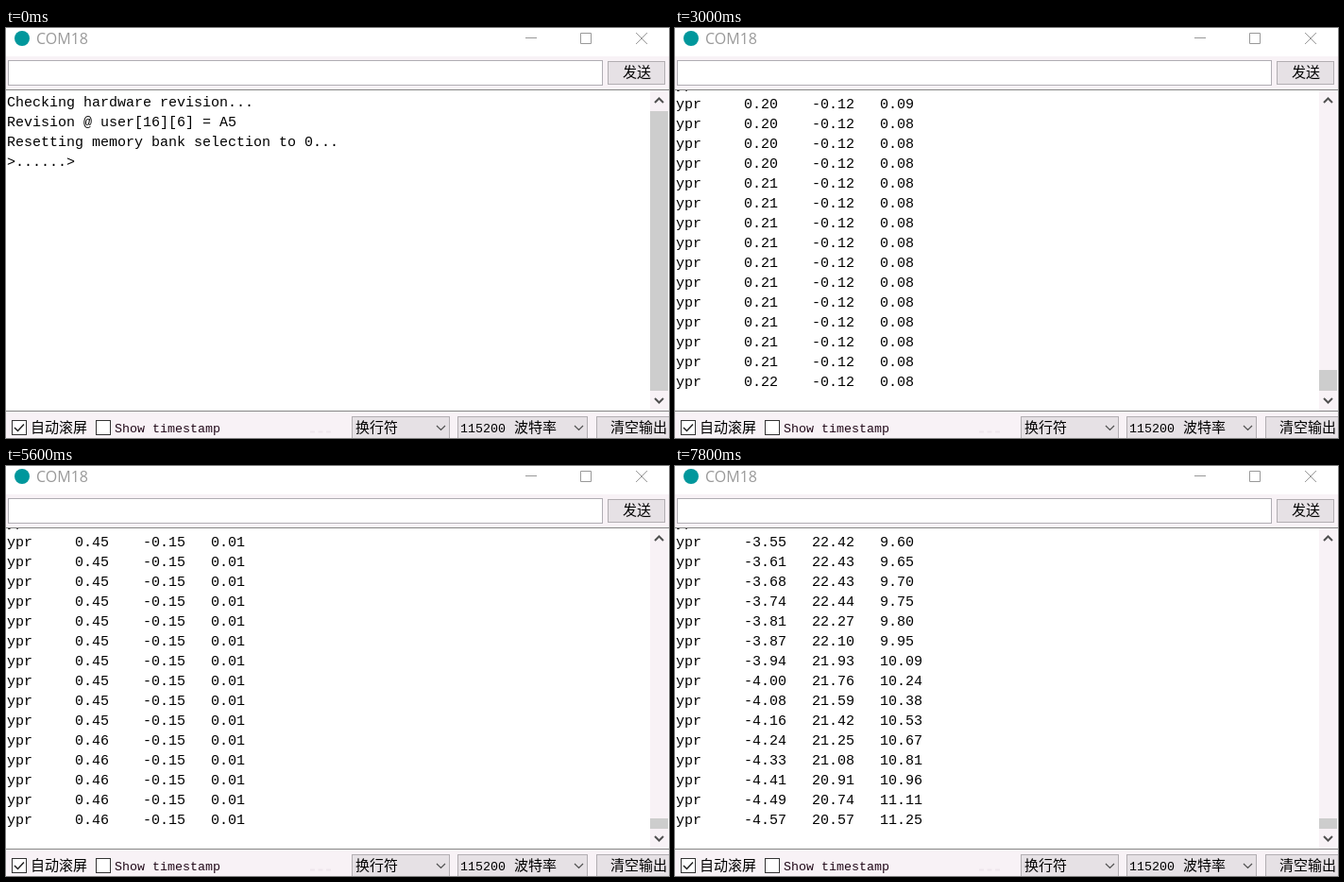
Animation, 702 px wide and 434 px high, one loop 8000 ms. Source, as an HTML page:

```html
<!DOCTYPE html>
<html lang="zh">
<head>
<meta charset="utf-8">
<title>COM18</title>
<style>
  html, body { margin: 0; width: 100%; height: 100%; overflow: hidden; background: #fff; }
  svg { display: block; }
  text { white-space: pre; }
  .cjk { font: 300 15px "Noto Sans CJK SC", "Noto Sans CJK", sans-serif; }
  .mono { font: 13.33px "Liberation Mono", monospace; }
  .log { font: 15px "Liberation Mono", monospace; }
  .title { font: 16px "Open Sans", sans-serif; fill: #999; }
  .line { fill: none; stroke: #999; }
  .chevron { fill: none; stroke: #505050; stroke-width: 1.2; }
  .arrow { fill: none; stroke: #505050; stroke-width: 2; }
  .button { fill: #e6e1e5; stroke: #b2aeb2; }
  .box { fill: #fff; stroke: #333; }
</style>
</head>
<body>
<svg width="702" height="434" viewBox="0 0 702 434">
  <rect width="702" height="434" fill="#f8f2f6"/>
  <rect width="702" height="30" fill="#fff"/>
  <circle cx="17" cy="11" r="8" fill="#00979c"/>
  <text class="title" x="32" y="17">COM18</text>
  <path class="line" d="M550 10.5h12M608.5 5.5h11v11h-11zM667 5l12 12M679 5l-12 12"/>

  <rect x="2.5" y="34.5" width="629" height="26" fill="#fff" stroke="#b0adb3"/>
  <rect class="button" x="637.5" y="35.5" width="60" height="24"/>
  <text class="cjk" x="653" y="52">发送</text>

  <rect y="65" width="702" height="341" fill="#868686"/>
  <rect y="66" width="702" height="339" fill="#fff"/>
  <svg id="log" class="log" y="66" width="681" height="339" viewBox="0 66 681 339"></svg>
  <rect x="682" y="66" width="19" height="339" fill="#f8f2f6"/>
  <rect id="thumb" x="682" width="19" fill="#cdcdcd"/>
  <path class="arrow" d="M687 79l4.5 -4.5 4.5 4.5M687 392l4.5 4.5 4.5 -4.5"/>

  <rect class="box" x="6.5" y="415.5" width="15" height="15"/>
  <path d="M9 423l3.5 3.5 6.5 -7" fill="none" stroke="#222" stroke-width="1.5"/>
  <text class="cjk" x="26" y="428">自动滚屏</text>
  <rect class="box" x="95.5" y="415.5" width="15" height="15"/>
  <text class="mono" x="115" y="428" fill="#200818">Show timestamp</text>
  <path d="M322 427.5h22" stroke="#eee6ec" stroke-width="2" stroke-dasharray="5 3.5"/>

  <rect class="button" x="366.5" y="411.5" width="103" height="25"/>
  <text class="cjk" x="370" y="428">换行符</text>
  <rect class="button" x="478.5" y="411.5" width="137" height="25"/>
  <text class="mono" x="481" y="428">115200</text>
  <text class="cjk" x="538" y="428">波特率</text>
  <path class="chevron" d="M456 421l4.5 4.5 4.5 -4.5M602 421l4.5 4.5 4.5 -4.5"/>
  <rect class="button" x="625.5" y="411.5" width="80" height="25"/>
  <text class="cjk" x="640" y="428">清空输出</text>
</svg>
<script>
const LOOP = 8000, STEP = 200, LINE = 21, VIEW = 338, TRACK = 296;
const intro = [
  "Checking hardware revision...",
  "Revision @ user[16][6] = A5",
  "Resetting memory bank selection to 0..."
];

// Key points [time, value] of each angle: slow drift, then a fast swing.
const yaw = [[925, 0], [2895, .205], [3900, .3055], [5555, .455], [6420, .5255],
  [7660, -3.55], [7730, -4], [7800, -4.57]];
const pitch = [[900, -.0385], [2900, -.12], [3930, -.14], [5700, -.15], [6420, -.076],
  [7660, 22.42], [7690, 22.44], [7800, 20.57]];
const roll = [[900, .5], [1330, .313], [1400, .294], [2200, .15], [2865, .085],
  [3850, .0345], [5700, .01], [6250, .056], [6420, .063], [6600, -1],
  [7660, 9.6], [7700, 9.8], [7800, 11.25]];

function sample(keys, t) {
  const i = Math.max(1, keys.findIndex(k => k[0] >= t));
  const [t0, a] = keys[i - 1], [t1, b] = keys[i];
  return a + (b - a) * (t - t0) / (t1 - t0);
}

// One reading arrives every 10 ms.
function reading(row) {
  const t = 890 + row * 10;
  const cells = [yaw, pitch, roll].map(k => sample(k, t).toFixed(2).replace("-0.00", "0.00"));
  return ["ypr", ...cells].map(s => s.padEnd(8)).join("");
}

function lineText(i, t) {
  if (i < 3) return intro[i];
  if (i > 3) return reading(i - 3);
  const dots = t < 800 ? Math.min(2, t / STEP) : 6;
  return ">......>" + ".".repeat(dots);
}

const log = document.getElementById("log"), thumb = document.getElementById("thumb");
const slots = Array.from({ length: 17 }, () => {
  const el = document.createElementNS("http://www.w3.org/2000/svg", "text");
  el.setAttribute("x", 1);
  return log.appendChild(el);
});

function draw(t) {
  const lines = 4 + Math.max(0, Math.floor((t - 890) / 10));
  const height = (lines + 1) * LINE;
  const scroll = Math.max(0, height - VIEW);
  const first = Math.max(0, lines - slots.length);
  slots.forEach((el, n) => {
    const i = first + n;
    el.textContent = i < lines ? lineText(i, t) : "";
    el.setAttribute("y", 83 + i * LINE - scroll);
  });
  const size = Math.max(11, Math.round(TRACK * Math.min(1, VIEW / height)));
  thumb.setAttribute("y", 384 - size);
  thumb.setAttribute("height", size);
}

let shown = -1;
const start = performance.now();
function tick() {
  const t = Math.floor((performance.now() - start) % LOOP / STEP) * STEP;
  if (t !== shown) draw(shown = t);
  requestAnimationFrame(tick);
}
tick();
</script>
</body>
</html>
```
